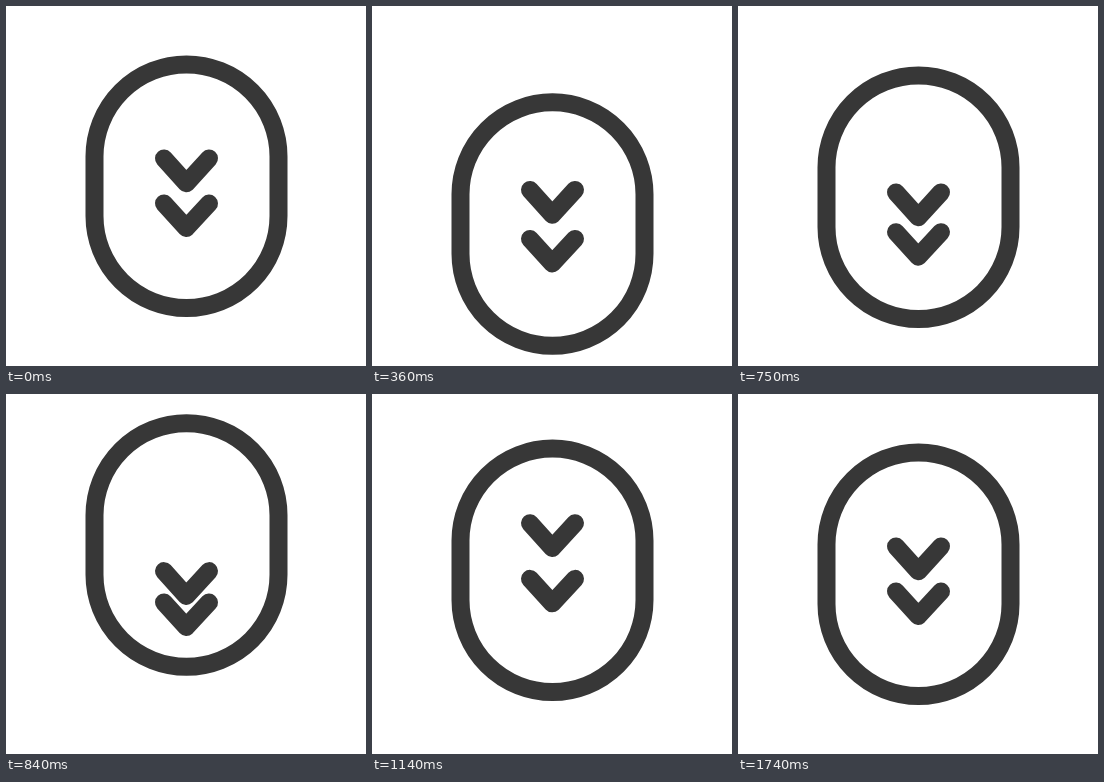
Animation of 360 by 360 pixels, one loop 1.8 s. Source, as an HTML page:

```html
<!DOCTYPE html>
<html lang="en">
<head>
<meta charset="utf-8">
<title>Scroll down</title>
<style>
  html, body { margin: 0; width: 100%; height: 100%; overflow: hidden; background: #fff; }
  svg { display: block; width: 100vw; height: 100vh; }
</style>
</head>
<body>
<svg viewBox="0 0 360 360" fill="none" stroke="#373737" stroke-width="18" stroke-linecap="round" stroke-linejoin="round">
  <rect id="body" x="88.5" y="58.5" width="184" height="243.5" rx="92"/>
  <path id="lower" d="M158 197.5 L180.3 222 L203 197.5"/>
  <path id="upper" d="M158 152.5 L180.3 177.3 L203 152.5"/>
</svg>
<script>
const LOOP = 1800, STEP = 30;

function bezier(x1, y1, x2, y2) {
  const at = (a, b, s) => 3 * a * s * (1 - s) ** 2 + 3 * b * s * s * (1 - s) + s ** 3;
  return p => {
    if (p <= 0) return 0;
    if (p >= 1) return 1;
    let lo = 0, hi = 1;
    for (let i = 0; i < 30; i++) {
      const mid = (lo + hi) / 2;
      if (at(x1, x2, mid) < p) lo = mid; else hi = mid;
    }
    return at(y1, y2, lo);
  };
}

const settle = bezier(0.25, 0.03, 0.25, 1);
const launch = bezier(0.94, 0, 0.65, 1);

// Start and length in ms, distance in px.
const moves = [
  { start: 0, length: 390, by: 38, ease: settle },
  { start: 450, length: 450, by: -73, ease: launch },
  { start: 900, length: 390, by: 35, ease: settle }
];

// The chevrons trail the body.
const parts = [["body", 0], ["lower", 90], ["upper", 150]]
  .map(([id, delay]) => ({ node: document.getElementById(id), delay }));

const offset = t => moves.reduce((y, m) => y + m.by * m.ease((t - m.start) / m.length), 0);

function draw(time) {
  const t = Math.floor((time % LOOP) / STEP) * STEP;
  for (const { node, delay } of parts) {
    node.setAttribute("transform", `translate(0 ${offset(t - delay).toFixed(2)})`);
  }
}

const origin = performance.now();
function tick() {
  draw(performance.now() - origin);
  requestAnimationFrame(tick);
}
tick();
</script>
</body>
</html>
```
